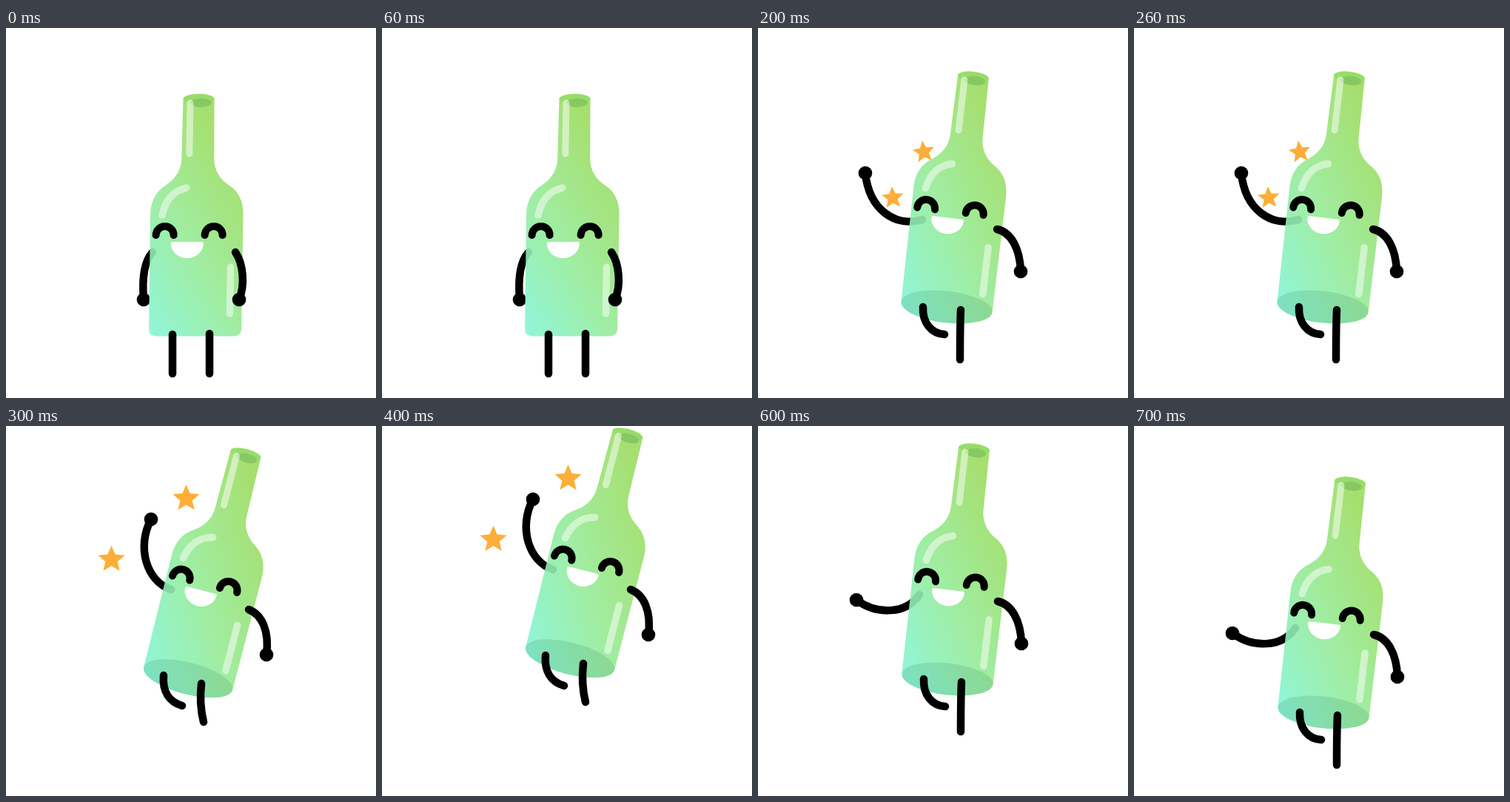
Recreate the animation shown at these times as an HTML page with a canvas. Size 500 by 500 pixels, loop 0.8 s.

```html
<!DOCTYPE html>
<html lang="en">
<head>
<meta charset="utf-8">
<title>Jumping bottle</title>
<style>
html, body { margin: 0; width: 100%; height: 100%; overflow: hidden; background: #fff; }
canvas { display: block; }
</style>
</head>
<body>
<canvas id="stage" width="500" height="500"></canvas>
<script>
const ctx = document.getElementById('stage').getContext('2d');
const LOOP = 800;
const TAU = Math.PI * 2;
const SHINE = 'rgba(255,255,255,0.5)';

// Limbs are cubic curves: start, two controls, end.
const standing = {
  left: [198, 303, 186, 316, 184, 342, 186, 367],
  right: [310, 303, 321, 319, 323, 348, 315, 367],
  legs: [[225, 414, 225, 430, 225, 450, 225, 467], [275, 413, 275, 430, 275, 450, 275, 467]]
};
const crouching = {
  left: [201, 324, 178, 323, 164, 345, 162, 378],
  right: [312, 324, 332, 327, 347, 348, 349, 378],
  legs: [[223, 435, 204, 443, 204, 458, 223, 467], [273, 435, 260, 443, 260, 458, 273, 467]]
};
const leaping = {
  left: [222, 259, 185, 270, 150, 245, 145, 196],
  right: [323, 272, 342, 276, 354, 298, 355, 329],
  legs: [[223, 377, 222, 398, 234, 413, 252, 414], [274, 381, 273, 403, 273, 425, 273, 448]]
};
const landing = { ...leaping, left: [217, 263, 199, 290, 159, 290, 132, 270] };
const soaring = {
  left: [223, 221, 190, 210, 176, 164, 196, 126],
  right: [328, 248, 346, 255, 356, 277, 352, 309],
  legs: [[213, 337, 211, 359, 221, 373, 238, 378], [264, 348, 262, 366, 263, 384, 267, 400]]
};
const bigStars = [[243.5, 98, 19, 0], [142.5, 180.5, 19, 0]];
const smallStars = [[224, 167.5, 15.5, -8], [182, 229.5, 15.5, -4]];

// at: start time, shift: offset of the whole figure, top: centre of the bottle's rim
const poses = [
  { at: 0, limbs: standing, top: [260.5, 96], tilt: 0, shift: [0, 0] },
  { at: 100, limbs: crouching, top: [259, 120], tilt: 0, shift: [0, 0] },
  { at: 200, limbs: leaping, top: [291, 66], tilt: 6.6, shift: [0, 0], stars: smallStars },
  { at: 300, limbs: soaring, top: [324, 38], tilt: 14.4, shift: [0, 0], stars: bigStars },
  { at: 400, limbs: soaring, top: [324, 38], tilt: 14.4, shift: [8, -27], stars: bigStars },
  { at: 600, limbs: landing, top: [291, 66], tilt: 6.6, shift: [1, -35] },
  { at: 700, limbs: landing, top: [291, 66], tilt: 6.6, shift: [1, 10] }
];

function disc(x, y, rx, ry, color) {
  ctx.fillStyle = color;
  ctx.beginPath();
  ctx.ellipse(x, y, rx, ry, 0, 0, TAU);
  ctx.fill();
}

function stroke(path, width, color) {
  ctx.lineWidth = width;
  ctx.strokeStyle = color;
  ctx.stroke(path);
}

function curve([x, y, ...rest]) {
  const p = new Path2D();
  p.moveTo(x, y);
  p.bezierCurveTo(...rest);
  return p;
}

function limb(points, hand) {
  stroke(curve(points), 10.5, '#000');
  if (hand) disc(points[6], points[7], 9.3, 9.3, '#000');
}

function star([x, y, r, deg]) {
  ctx.beginPath();
  for (let i = 0; i < 10; i++) {
    const a = i * Math.PI / 5 - Math.PI / 2 + deg * Math.PI / 180;
    const d = i % 2 ? r * 0.45 : r;
    ctx.lineTo(x + d * Math.cos(a), y + d * Math.sin(a));
  }
  ctx.fillStyle = '#fdae38';
  ctx.fill();
}

function outline(open) {
  const p = new Path2D();
  p.moveTo(-21, 0);
  p.lineTo(-22, 80);
  p.bezierCurveTo(-22, 96, -30, 108, -42, 116);
  p.bezierCurveTo(-56, 125, -63, 138, -63, 156);
  if (open) {
    p.lineTo(-62, 313);
    p.ellipse(0, 313, 62, 21.5, 0, Math.PI, 0, true);
  } else {
    p.lineTo(-62.5, 310);
    p.quadraticCurveTo(-62.5, 320.5, -52, 320.5);
    p.lineTo(52, 320.5);
    p.quadraticCurveTo(62.5, 320.5, 62.5, 310);
  }
  p.lineTo(62.5, 156);
  p.bezierCurveTo(62.5, 138, 56, 125, 42, 116);
  p.bezierCurveTo(30, 108, 22, 96, 22, 80);
  p.lineTo(21, 0);
  p.ellipse(0, 0, 21, 7, 0, 0, Math.PI, true);
  p.closePath();
  return p;
}

const shapes = [outline(false), outline(true)];

const glass = ctx.createLinearGradient(-70, 290, 110, 180);
glass.addColorStop(0, '#91f5d6');
glass.addColorStop(0.45, '#a0eda3');
glass.addColorStop(1, '#a6df6e');

function place(pose) {
  ctx.translate(...pose.top);
  if (pose.tilt) ctx.rotate(pose.tilt * Math.PI / 180);
  else ctx.transform(1, 0, -0.0157, 1, 0, 0);
}

function bottle(pose) {
  const open = pose.tilt > 0;
  const shape = shapes[+open];

  limb(pose.limbs.left, true);
  ctx.save();
  place(pose);
  ctx.fillStyle = glass;
  ctx.fill(shape);
  ctx.restore();

  // the arm behind shows faintly through the glass
  ctx.save();
  ctx.save();
  place(pose);
  const m = ctx.getTransform();
  ctx.restore();
  const base = ctx.getTransform();
  ctx.setTransform(m);
  ctx.clip(shape);
  ctx.setTransform(base);
  stroke(curve(pose.limbs.left), 10.5, 'rgba(0,60,30,0.14)');
  ctx.restore();

  ctx.save();
  place(pose);
  if (open) disc(0, 313, 62, 21.5, 'rgba(0,90,50,0.13)');
  disc(0, 0, 21, 7, 'rgba(130,215,95,0.4)');
  disc(3, 5, 14, 6, '#86c963');
  stroke(new Path2D('M-11.5 5.5V74'), 9, SHINE);
  stroke(new Path2D('M-15 120Q-41 126-47 157'), 9.5, SHINE);
  stroke(new Path2D('M46.5 227V290'), 9.5, SHINE);

  for (const x of [-43, 23]) {
    const eye = new Path2D();
    eye.arc(x, 184, 12, Math.PI, 0);
    stroke(eye, 10, '#000');
  }
  ctx.fillStyle = '#fff';
  ctx.fill(new Path2D('M-33 193H8Q9.5 193 9.5 195A22 20 0 0 1-34.5 195Q-34.5 193-33 193Z'));
  ctx.restore();
}

function draw(time) {
  const t = time % LOOP;
  const pose = poses.filter(p => p.at <= t).pop();
  ctx.setTransform(1, 0, 0, 1, 0, 0);
  ctx.fillStyle = '#fff';
  ctx.fillRect(0, 0, 500, 500);
  ctx.lineCap = 'round';
  ctx.translate(...pose.shift);
  bottle(pose);
  limb(pose.limbs.right, true);
  pose.limbs.legs.forEach(leg => limb(leg));
  (pose.stars || []).forEach(star);
}

const start = performance.now();
function tick() {
  draw(performance.now() - start);
  requestAnimationFrame(tick);
}
draw(0);
requestAnimationFrame(tick);
</script>
</body>
</html>
```
